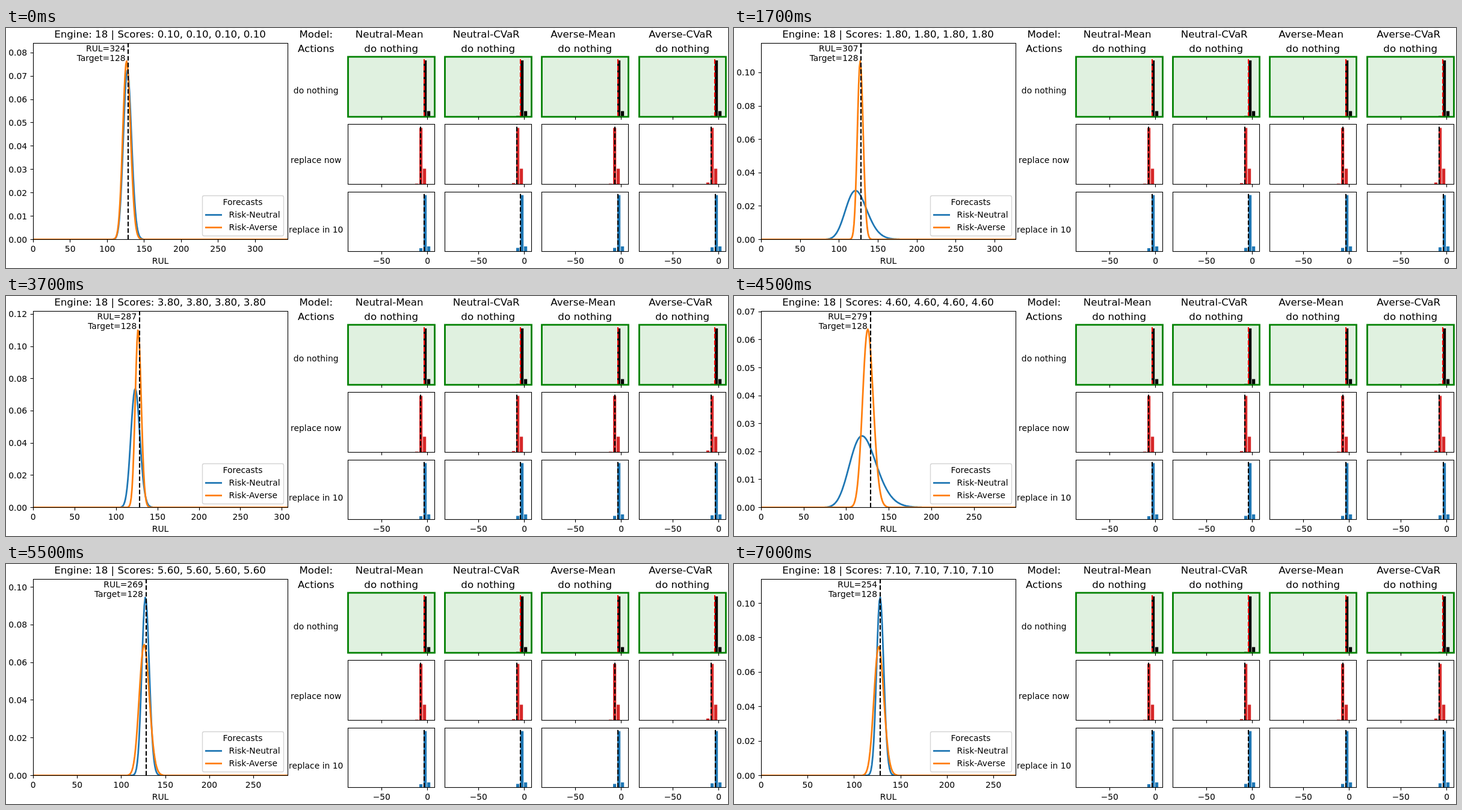
Recreate the animation shown at these times as an HTML page. Size 1200 px wide and 400 px high, loop 7100 ms.

```html
<!DOCTYPE html>
<html lang="en">
<head>
<meta charset="utf-8">
<title>Engine forecasts</title>
<style>
  html, body { margin: 0; width: 100%; height: 100%; overflow: hidden; background: #fff; }
  svg { display: block; width: 1200px; height: 400px; }
  text { font: 13.89px "DejaVu Sans", Verdana, sans-serif; text-anchor: middle; }
  text.big { font-size: 16.67px; }
  text.start { text-anchor: start; }
  text.end { text-anchor: end; }
</style>
</head>
<body>
<svg id="stage" viewBox="0 0 1200 400"></svg>
<script>
const STEP = 100, COUNT = 71;
const BLUE = '#1f77b4', ORANGE = '#ff7f0e', RED = '#d62728';
const PT = 100 / 72;
const DASH = [5.55 * PT, 2.4 * PT].join(' ');
const PLOT = { left: 45.5, right: 468.5, top: 25.5, bottom: 352.5 };
const TARGET = 128;

// step, then peak and mode of the neutral and the averse density
const KEYS = [
  [0, .0724, 127, .0764, 126],
  [9, .0239, 114.3, .0214, 108.3],
  [17, .0293, 121, .1069, 127],
  [28, .2429, 128, .206, 128],
  [45, .0256, 118.3, .0638, 125],
  [55, .0947, 127.3, .0695, 125.8],
  [70, .1036, 127.8, .075, 126.4]
];

const stage = document.getElementById('stage');

function add(parent, tag, attrs, content) {
  const el = document.createElementNS('http://www.w3.org/2000/svg', tag);
  for (const name in attrs) el.setAttribute(name, attrs[name]);
  if (content !== undefined) el.textContent = content;
  parent.appendChild(el);
  return el;
}
const label = (parent, x, y, content, cls = '') =>
  add(parent, 'text', { x, y, class: cls }, content);
const line = (parent, x1, y1, x2, y2, stroke = '#000', width = .8 * PT) =>
  add(parent, 'line', { x1, y1, x2, y2, stroke, 'stroke-width': width });
const rect = (parent, x, y, width, height, attrs) =>
  add(parent, 'rect', { x, y, width, height, ...attrs });

// Centre of the pixel that holds v
const snap = v => Math.floor(v) + .5;

function dashed(parent, x, top, bottom, color) {
  const el = line(parent, x, bottom, x, top, color, 1.5 * PT);
  el.setAttribute('stroke-dasharray', DASH);
  return el;
}

// Small histograms
const COLUMNS = [
  { x: 568.5, name: 'Neutral-Mean', marks: [126.4, 120.4, 126], tails: [0, 1, 5.5] },
  { x: 729.5, name: 'Neutral-CVaR', marks: [125.8, 119.8, 125.8], tails: [1.5, 2, 6] },
  { x: 890.5, name: 'Averse-Mean', marks: [126.8, 121.6, 126.8], tails: [0, 1, 6] },
  { x: 1052.5, name: 'Averse-CVaR', marks: [125.9, 119.2, 126.2], tails: [1.5, 3, 7] }
];
const ROWS = [
  { y: 48, h: 100, name: 'do nothing', bars: '#000', mark: '#f00', shift: 0, side: 9.5, chosen: true },
  { y: 160.5, h: 100, name: 'replace now', bars: RED, mark: '#000', shift: -7, side: 26 },
  { y: 273.5, h: 99, name: 'replace in 10', bars: BLUE, mark: '#000', shift: 0, side: 8.5 }
];
const CELL_WIDTH = 144;

function drawCell(col, row, r) {
  const { x } = col, base = row.y + row.h;
  if (row.chosen) rect(stage, x, row.y, CELL_WIDTH, row.h, { fill: '#e0f1e0' });
  [[118.9, col.tails[r]], [125.6, 94], [131.9, row.side]].forEach(([dx, h]) =>
    rect(stage, Math.round(x + dx + row.shift), base - h, 5.2, h, { fill: row.bars }));
  dashed(stage, Math.round(x + col.marks[r]), row.y, base, row.mark);
  rect(stage, x, row.y, CELL_WIDTH, row.h, {
    fill: 'none',
    stroke: row.chosen ? 'green' : '#000',
    'stroke-width': (row.chosen ? 2 : .8) * PT
  });
  [[55.8, '\u221250'], [132.2, '0']].forEach(([dx, value]) => {
    const tx = snap(x + dx);
    line(stage, tx, base, tx, base + 4.9);
    if (r === 2) label(stage, x + dx, 393, value);
  });
}

label(stage, 515.3, 16, 'Model:', 'big');
label(stage, 515.3, 40, 'Actions', 'big');
ROWS.forEach((row, r) => {
  label(stage, 515.2, [109, 225, 341][r], row.name);
  COLUMNS.forEach(col => drawCell(col, row, r));
});
COLUMNS.forEach(col => {
  label(stage, col.x + 68.7, 16, col.name, 'big');
  label(stage, col.x + 71.7, 40, 'do nothing', 'big');
});

// Forecast plot
const width = PLOT.right - PLOT.left, height = PLOT.bottom - PLOT.top;
const clip = add(add(stage, 'defs'), 'clipPath', { id: 'plot' });
rect(clip, PLOT.left, PLOT.top, width, height);
const inside = add(stage, 'g', { 'clip-path': 'url(#plot)' });
const curves = [BLUE, ORANGE].map(stroke => add(inside, 'path', {
  fill: 'none', stroke, 'stroke-width': 2 * PT, 'stroke-linejoin': 'round'
}));
const targetLine = dashed(inside, 0, PLOT.top, PLOT.bottom, '#000');
rect(stage, PLOT.left, PLOT.top, width, height,
  { fill: 'none', stroke: '#000', 'stroke-width': .8 * PT });
const ticks = add(stage, 'g');
const title = label(stage, 256, 16, '', 'big');
const lifeText = label(stage, 0, 39, '', 'end');
const targetText = label(stage, 0, 55, 'Target=' + TARGET, 'end');
label(stage, 256.5, 393, 'RUL');

rect(stage, 326.5, 279.5, 135, 67, {
  rx: 2.8, fill: '#fff', 'fill-opacity': .8, stroke: '#d4d4d4', 'stroke-width': PT
});
label(stage, 393.5, 295, 'Forecasts');
[['Risk-Neutral', BLUE, 311.5], ['Risk-Averse', ORANGE, 332.5]].forEach(([name, color, y]) => {
  line(stage, 331, y, 359, y, color, 2 * PT);
  label(stage, 370.6, y + 4.5, name, 'start');
});

const mix = (a, b, p) => a + (b - a) * p;
const mixLog = (a, b, p) => Math.exp(mix(Math.log(a), Math.log(b), p));

function forecasts(k) {
  const i = Math.min(KEYS.findLastIndex(key => key[0] <= k), KEYS.length - 2);
  const a = KEYS[i], b = KEYS[i + 1], p = (k - a[0]) / (b[0] - a[0]);
  return [1, 3].map(j => ({
    peak: mixLog(a[j], b[j], p),
    mode: mix(a[j + 1], b[j + 1], p)
  }));
}

// Log-normal density written around its mode
function density({ peak, mode }, x) {
  const s = 1 / (mode * peak * Math.sqrt(2 * Math.PI));
  return peak * Math.exp(-((Math.log(x / mode) / s) ** 2) / 2);
}

// Smallest round step that leaves at most nine intervals
function tickStep(range) {
  const power = Math.floor(Math.log10(range / 9)), unit = 10 ** power;
  const factor = [1, 2, 2.5, 5, 10].find(f => f * unit >= range / 9);
  const digits = Math.max(0, factor === 10 ? -power - 1 : factor === 2.5 ? 1 - power : -power);
  return { step: factor * unit, digits };
}

function draw(k) {
  const life = 324 - k, xMax = life + 20;
  const pair = forecasts(k);
  const yMax = 1.1 * Math.max(...pair.map(f => f.peak));
  const px = x => PLOT.left + x / xMax * width;
  const py = y => PLOT.bottom - y / yMax * height;

  const score = ((k + 1) / 10).toFixed(2);
  title.textContent = 'Engine: 18 | Scores: ' + Array(4).fill(score).join(', ');
  lifeText.textContent = 'RUL=' + life;
  [lifeText, targetText].forEach(el => el.setAttribute('x', px(TARGET - 3) - .5));
  ['x1', 'x2'].forEach(end => targetLine.setAttribute(end, Math.round(px(TARGET))));

  pair.forEach((f, i) => {
    let d = '';
    for (let x = 0; x <= xMax; x++)
      d += (x ? 'L' : 'M') + px(x).toFixed(2) + ' ' + py(density(f, x)).toFixed(2);
    curves[i].setAttribute('d', d);
  });

  ticks.replaceChildren();
  for (let x = 0; x <= xMax; x += 50) {
    const tx = snap(px(x));
    line(ticks, tx, PLOT.bottom, tx, PLOT.bottom + 4.9);
    label(ticks, px(x) - .3, 373, x);
  }
  const { step, digits } = tickStep(yMax);
  for (let n = 0; n * step <= yMax; n++) {
    const y = py(n * step);
    line(ticks, PLOT.left - 4.9, snap(y), PLOT.left, snap(y));
    label(ticks, 35.2, Math.round(y + 5), (n * step).toFixed(digits), 'end');
  }
}

const start = performance.now();
let shown = -1;
function tick() {
  const k = Math.floor((performance.now() - start) / STEP) % COUNT;
  if (k !== shown) draw(shown = k);
  requestAnimationFrame(tick);
}
tick();
</script>
</body>
</html>
```
